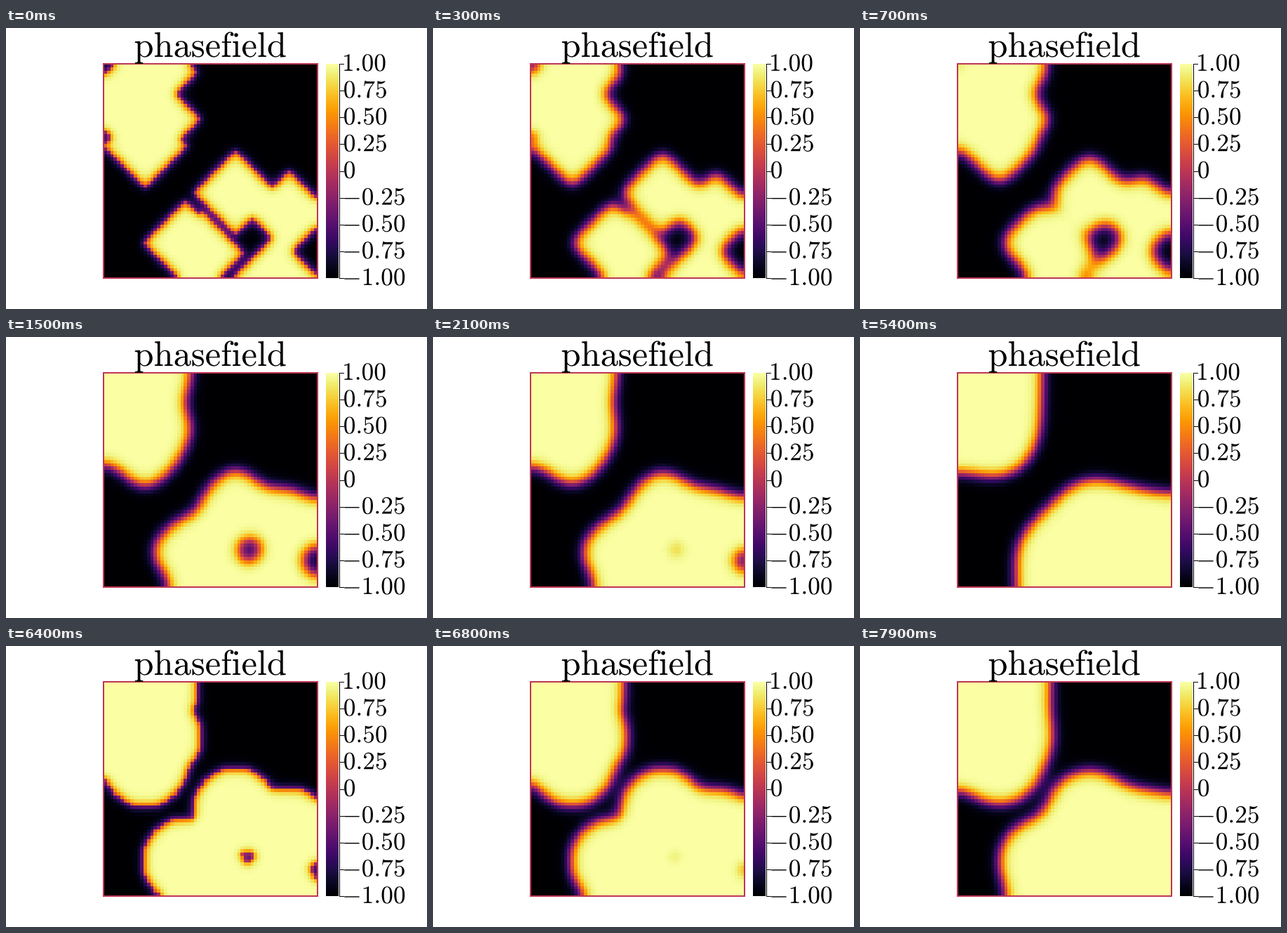
Recreate the animation shown at these times as a matplotlib script. Size 600 by 400 pixels, loop 8 s.

```python
import numpy as np
import matplotlib.pyplot as plt
from matplotlib.animation import FuncAnimation
from matplotlib.patches import PathPatch, Rectangle
from matplotlib.textpath import TextPath
from matplotlib.transforms import Affine2D

plt.rcParams["mathtext.fontset"] = "cm"

W, H = 600, 400
LEFT, RIGHT, TOP, BOTTOM = 139, 444, 51, 356
N = 64                  # grid cells per side
RADIUS = 0.2 * N        # seed size in cells
WIDTH = 2.0             # interface width in cells
TAU = 0.8               # time step per frame
FRAMES, RESET = 80, 63

SEEDS = [(12, 24), (16, 16), (15, 2), (4, 11), (24, 53),
         (39, 38), (29, 56), (55, 44), (51, 63)]

# Cosine modes diagonalise the Laplacian with no-flux walls.
k = np.arange(N)
MODES = np.cos(np.pi * np.outer(k + 0.5, k) / N)
MODES /= np.linalg.norm(MODES, axis=0)
EIGEN = 2 - 2 * np.cos(np.pi * k / N)
DAMPING = 1 + TAU * (EIGEN[:, None] + EIGEN[None, :])


def seed_field(norm):
    """Union of balls around the seeds in the given norm, +1 inside, -1 outside."""
    x, y = np.meshgrid(k, k)
    dist = [norm(np.abs(x - sx), np.abs(y - sy)) for sx, sy in SEEDS]
    return np.where(np.min(dist, axis=0) < RADIUS, 1.0, -1.0)


def step(u):
    """Allen-Cahn step: implicit diffusion, explicit reaction."""
    rhs = u + TAU * 2 / WIDTH**2 * (u - u**3)
    return MODES @ ((MODES.T @ rhs @ MODES) / DAMPING) @ MODES.T


def run(u, count):
    states = [u]
    while len(states) < count:
        states.append(step(states[-1]))
    return states


diamonds = run(seed_field(lambda a, b: a + b), RESET + 1)[1:]
discs = run(seed_field(np.hypot), FRAMES - RESET)
fields = diamonds + discs

fig = plt.figure(figsize=(W / 100, H / 100), dpi=100, facecolor="white")
ax = fig.add_axes([0, 0, 1, 1])
ax.axis("off")


def picture(data, left, right):
    return ax.imshow(data, cmap="inferno", vmin=-1, vmax=1, aspect="auto",
                     interpolation="nearest", extent=(left, right, BOTTOM, TOP))


def label(x, y, text, size, align):
    """Text on baseline y; align 0 puts its ink right of x, 0.5 centres it."""
    path = TextPath((0, 0), f"$\\mathrm{{{text}}}$", size=size)
    box = path.get_extents()
    shift = x - box.x0 - align * box.width
    place = Affine2D().scale(1, -1).translate(shift, y)
    ax.add_patch(PathPatch(place.transform_path(path), fc="black", lw=0))


heat = picture(fields[0], LEFT, RIGHT)
ax.add_patch(Rectangle((LEFT, TOP), RIGHT - LEFT, BOTTOM - TOP, fill=False,
                       ec=plt.get_cmap("inferno")(0.5), lw=2 * 0.72))
label(291.2, 41.3, "phasefield", 50.5, 0.5)

picture(np.linspace(1, -1, 256)[:, None], 456, 474)
ax.plot([474.5, 474.5], [TOP, BOTTOM], color="black", lw=0.72)
for i in range(9):
    value = 1 - i / 4
    y = TOP + (BOTTOM - TOP) * i / 8
    ax.plot([474.5, 480.5], [y, y], color="black", lw=0.72)
    label(482.1, y + 10, f"{value:.2f}" if value else "0", 35.4, 0)

ax.set_xlim(0, W)
ax.set_ylim(H, 0)


def draw(i):
    heat.set_data(fields[i])
    return (heat,)


anim = FuncAnimation(fig, draw, frames=FRAMES, interval=100, repeat=True)
plt.show()
```
